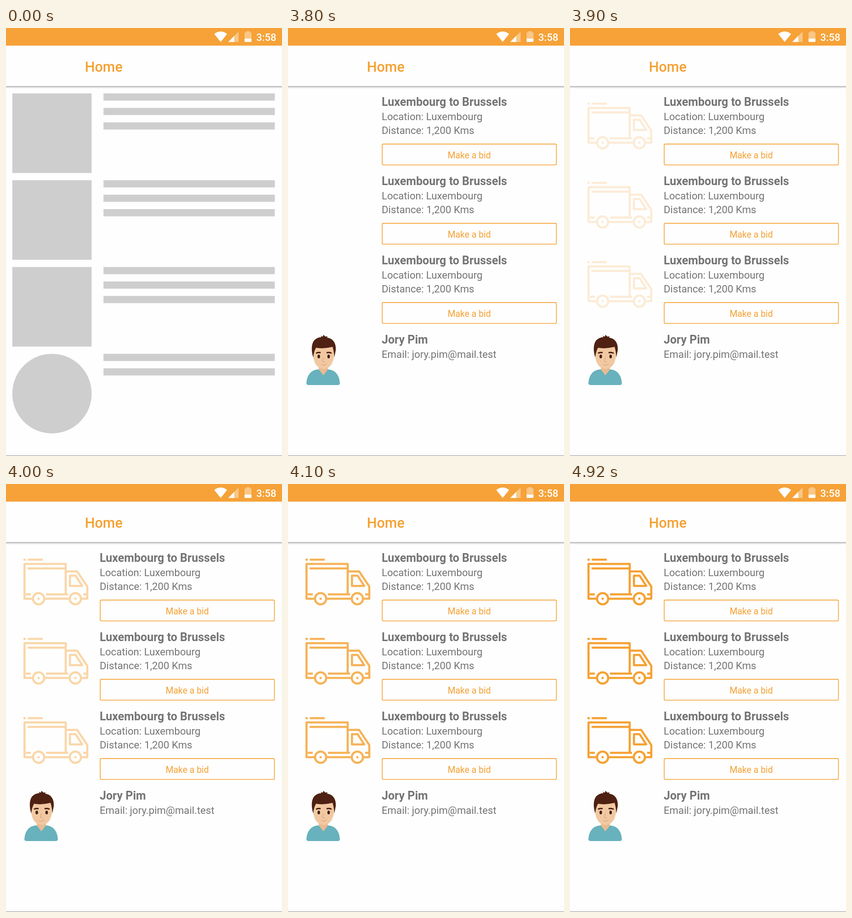
Write an HTML page that moves like this. It is 601 px wide and 929 px high and loops after 5400 ms.

```html
<!DOCTYPE html>
<html lang="en">
<head>
<meta charset="utf-8">
<title>Loading list</title>
<style>
  html, body { margin: 0; width: 100%; height: 100%; overflow: hidden; background: #fefefe; }
  svg { display: block; width: 100%; height: 100%; font-family: Roboto, sans-serif; }
  .title { font-size: 25px; font-weight: 700; fill: #747474; }
  .info { font-size: 22.2px; fill: #747474; }
  .bid { font-size: 19.4px; fill: #f5a133; text-anchor: middle; }
  .truck { fill: none; stroke: #f5a133; stroke-width: 4.6; stroke-linejoin: round; }
</style>
</head>
<body>
<svg viewBox="0 0 601 929">
  <defs>
    <linearGradient id="shade" x2="0" y2="1">
      <stop stop-color="#000" stop-opacity=".34"/>
      <stop offset=".4" stop-color="#000" stop-opacity=".15"/>
      <stop offset="1" stop-color="#000" stop-opacity="0"/>
    </linearGradient>
    <g id="truck" class="truck">
      <path d="M38 164.3h5M47.5 164.3H80"/>
      <path d="M58 249H40.3V173.5H130V239.5M47 183.3H128"/>
      <path d="M130 189.7H155L177 222.5V249H165M85 249H137"/>
      <path d="M43 239.5H54M87 239.5H135M168 239.5H177"/>
      <path d="M139.3 199H151.5L166 221.3H139.3Z"/>
      <circle cx="71" cy="249" r="12.2"/>
      <circle cx="151" cy="249" r="12.2"/>
      <path d="M68.7 249h4.6M148.7 249h4.6"/>
    </g>
  </defs>

  <rect width="601" height="929" fill="#fefefe"/>
  <rect y="126" width="601" height="5.5" fill="url(#shade)"/>
  <rect width="601" height="38.3" fill="#f6a238"/>
  <g fill="#fff">
    <path d="M453.5 13Q467.5 2 481.5 13L467.5 30.2Z"/>
    <path d="M484 30.2H506.5V7.7Z" opacity=".4"/>
    <path d="M484 30.2H497V17.2Z"/>
    <path d="M519.5 9.5H523V7H531V9.5H534.5V23H519.5Z" opacity=".4"/>
    <path d="M519.5 23H534.5V30.2H519.5Z"/>
    <text x="545" y="27.6" font-size="22.2" font-weight="500">3:58</text>
  </g>
  <text x="171.7" y="95" font-size="30.6" font-weight="500" fill="#f5a133">Home</text>
  <rect y="928" width="601" height="1" fill="#8c8c8c"/>

  <g id="skeleton" fill="#cecece"></g>

  <g id="content">
    <g id="trucks"></g>
    <g id="cards"></g>
    <g id="avatar">
      <path d="M40 772C41 752 51 742 66 741H87C102 742 112 752 113 772Q112 775 108 775H45Q41 775 40 772Z" fill="#67b2bc"/>
      <path d="M68 730H87V741L77 754L67 741Z" fill="#e9bb92"/>
      <path d="M54 692C53 718 58 739 77.500 740C97 739 102 718 101 692Q78 680 54 692Z" fill="#f1c8a1"/>
      <path d="M55 715C50 700 51 685 57 678Q64 671 73 671L71 668L76 670L77 666L82 670L86 669L85 672C99 674 105 685 104 699L101 715Q100 701 97 692Q78 697 61 694Q56 703 55 715Z" fill="#4e2112"/>
      <path d="M61 706Q66 703 71 705M84 705Q90 703 95 706" fill="none" stroke="#4e2112" stroke-width="3"/>
      <ellipse cx="67" cy="713" rx="2.8" ry="4" fill="#3c2018"/>
      <ellipse cx="88.500" cy="713" rx="2.8" ry="4" fill="#3c2018"/>
      <path d="M77 715L75 723Q77 726 80 724M72 730Q78 734 84 729" fill="none" stroke="#d9a57c" stroke-width="1.2"/>
    </g>
  </g>
</svg>
<script>
  const LOOP = 5400, LOADED = 3800, STEP = 100;
  const FADE = [0, 0.2, 0.42, 0.82, 1];
  const byId = id => document.getElementById(id);
  const rect = (x, y, w, h, more = '') =>
    `<rect x="${x}" y="${y}" width="${w}" height="${h}" ${more}/>`;
  const text = (kind, x, y, words) => `<text class="${kind}" x="${x}" y="${y}">${words}</text>`;

  function placeholder(row) {
    const y = 142 + row * 188.4, last = row === 3;
    const image = last
      ? `<circle cx="100.1" cy="${y + 86.4}" r="86.4"/>`
      : rect(13.7, y, 172.7, 172.7);
    const bars = Array.from({ length: last ? 2 : 3 },
      (_, i) => rect(212.3, y + i * 31.4, 373, 15.6));
    return image + bars.join('');
  }

  const heading = (y, title, info) =>
    text('title', 204, y + 169, title) + text('info', 204, y + 199.5, info);

  const card = y =>
    heading(y, 'Luxembourg to Brussels', 'Location: Luxembourg') +
    text('info', 204, y + 229.5, 'Distance: 1,200 Kms') +
    rect(205.2, y + 251.9, 379.3, 45.4, 'rx="2.5" fill="none" stroke="#f5a133" stroke-width="1.6"') +
    text('bid', 394.7, y + 282.8, 'Make a bid');

  const rows = [0, 172, 344];
  byId('skeleton').innerHTML = [0, 1, 2, 3].map(placeholder).join('');
  byId('trucks').innerHTML = rows.map(y => `<use href="#truck" y="${y}"/>`).join('');
  byId('cards').innerHTML = rows.map(card).join('') +
    heading(516, 'Jory Pim', 'Email: jory.pim@mail.test');

  function render(time) {
    const since = time % LOOP - LOADED;
    const loaded = since >= 0;
    const step = Math.min(Math.floor(Math.max(since, 0) / STEP), FADE.length - 1);
    byId('skeleton').style.display = loaded ? 'none' : '';
    byId('content').style.display = loaded ? '' : 'none';
    byId('trucks').style.opacity = FADE[step];
  }

  const start = performance.now();
  function tick() {
    render(performance.now() - start);
    requestAnimationFrame(tick);
  }
  tick();
</script>
</body>
</html>
```
